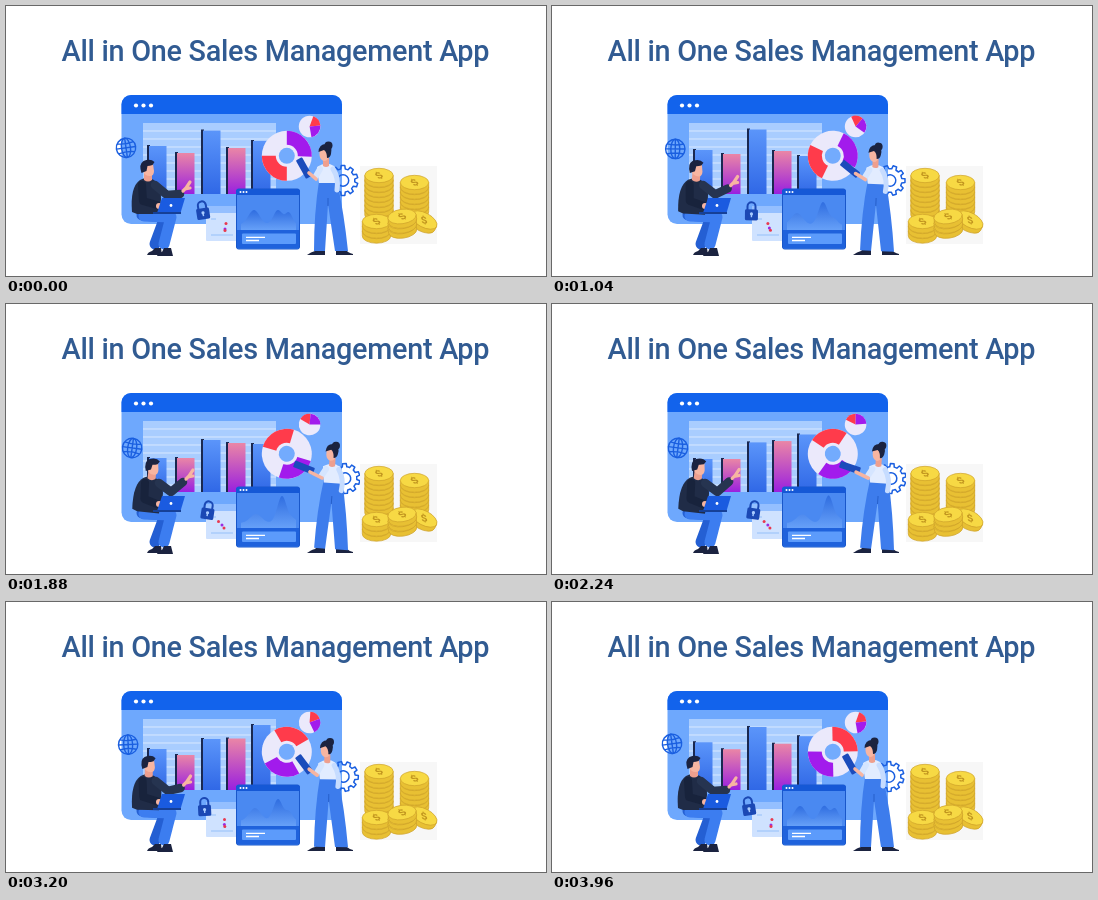
Write an HTML page that moves like this. It is 540 px wide and 270 px high and loops after 4 s.

```html
<!DOCTYPE html>
<html lang="en">
<head>
<meta charset="utf-8">
<title>Sales Management</title>
<style>
html, body { margin: 0; width: 100%; height: 100%; overflow: hidden; background: #fff; }
svg { display: block; width: 100%; height: 100%; }
.title { font: 500 28.8px Roboto, "Open Sans", sans-serif; letter-spacing: -.28px; fill: #315b92; }
.coin { font: 700 12px Roboto, sans-serif; fill: #c1951f; text-anchor: middle; }
.limb { fill: none; stroke-linecap: round; stroke-linejoin: round; }
</style>
</head>
<body>
<svg viewBox="0 0 540 270">
  <defs>
    <linearGradient id="blueBar" x1="0" y1="0" x2="0" y2="1">
      <stop offset="0" stop-color="#5b95fa"/><stop offset="1" stop-color="#3068e6"/>
    </linearGradient>
    <linearGradient id="pinkBar" x1="0" y1="0" x2="0" y2="1">
      <stop offset="0" stop-color="#ea86a6"/><stop offset="1" stop-color="#9a20df"/>
    </linearGradient>
    <linearGradient id="waveFill" x1="0" y1="0" x2="0" y2="1">
      <stop offset="0" stop-color="#2f6de0"/><stop offset="1" stop-color="#66a0f8"/>
    </linearGradient>
  </defs>
  <rect width="540" height="270" fill="#fff"/>
  <text class="title" x="55.5" y="55">All in One Sales Management App</text>

  <!-- main window -->
  <rect x="115.500" y="89" width="220.500" height="129" rx="9.500" fill="#6ea8fd"/>
  <path d="M115.500 108V98.500a9.500 9.500 0 0 1 9.500-9.500H326.500a9.500 9.500 0 0 1 9.500 9.500V108Z" fill="#1263ec"/>
  <g fill="#fff"><circle cx="130" cy="99.500" r="2.100"/><circle cx="137.500" cy="99.500" r="2.100"/><circle cx="145" cy="99.500" r="2.100"/></g>
  <rect x="137" y="117" width="133" height="71" fill="#a9cdff"/>
  <g id="grid" stroke="#d8e8ff" stroke-width="1"></g>
  <g id="bars"></g>
  <g id="donut"></g>
  <g id="pie"></g>

  <g id="globe" fill="none" stroke="#1a5fe0" stroke-width="1.400">
    <circle r="9.700"/><ellipse rx="4.500" ry="9.700"/>
    <path d="M0-9.700V9.700M-9.700 0H9.700M-8.200-5Q0-3 8.200-5M-8.200 5Q0 3 8.200 5"/>
  </g>
  <g id="gear" fill="none" stroke="#1a5fe0" stroke-width="1.500" stroke-linejoin="round">
    <path id="teeth"/><circle r="5.700"/>
  </g>

  <!-- small card with lock -->
  <rect x="200" y="200" width="33" height="35" rx="1" fill="#cfe2ff"/>
  <rect x="200" y="200" width="33" height="7" fill="#94bfff"/>
  <path d="M205 213H210M205 229H227" stroke="#a9cbfb" stroke-width="1.400"/>
  <g id="dots"></g>
  <g id="lock">
    <path d="M-4-1V-5a4 4 0 0 1 8 0V-1" fill="none" stroke="#1b48b4" stroke-width="2"/>
    <rect x="-6.500" y="-2" width="13" height="11" rx="1.500" fill="#1b48b4"/>
    <circle cy="2.500" r="1.600" fill="#a9cbff"/><path d="M0 3V6" stroke="#a9cbff" stroke-width="1.400"/>
  </g>

  <!-- wave window -->
  <rect x="230.500" y="183" width="63" height="60" rx="2" fill="#4a89f1" stroke="#1957ca" stroke-width="1"/>
  <path d="M230 189V185.500a2.500 2.500 0 0 1 2.500-2.500H291.500a2.500 2.500 0 0 1 2.500 2.500V189Z" fill="#1558d6"/>
  <g fill="#fff"><circle cx="234.500" cy="186" r="1"/><circle cx="237.500" cy="186" r="1"/><circle cx="240.500" cy="186" r="1"/></g>
  <path id="wave" fill="url(#waveFill)"/>
  <rect x="231" y="224" width="62" height="18.500" fill="#1f62dc"/>
  <rect x="236" y="227.500" width="54" height="10.500" rx="1" fill="#5c9bfb"/>
  <path d="M240 231.300H259M240 234.500H253" stroke="#fff" stroke-width="1.300"/>

  <!-- seated man -->
  <g class="limb" stroke="#245fd3" stroke-width="11">
    <path d="M136 209L159 211L149 238"/>
    <path d="M138 210L165 211L158 238" stroke="#3c7df0"/>
  </g>
  <path d="M141 249q1-3 5-4l3-3h6l1 7Z M151 250q1-3 5-4l2-4h7l2 8Z" fill="#1b2340"/>
  <g id="man">
    <path d="M126 206Q124 181 134 174Q141 170 148 174Q156 181 155 193L153 208H131Z" fill="#202c47"/>
    <path d="M138 166h8v8q-4 3-8 0Z" fill="#ee9f8e"/>
    <path d="M137 158h10l1 7q0 5-4 5-6 0-7-6Z" fill="#f7b5a1"/>
    <path d="M135.500 167q-3-9 2-12 7-3 11 1l-2 3q-3 1-5 1l-1 5Z" fill="#1b2340"/>
    <path d="M136 179L137 195L151 199" class="limb" stroke="#18233c" stroke-width="8"/>
  </g>
  <path id="manArm" class="limb" stroke="#263450" stroke-width="8.500"/>
  <path id="manHand" class="limb" stroke="#f7b5a1" stroke-width="3.200"/>
  <circle cx="153" cy="200" r="3" fill="#f7b5a1"/>
  <path d="M156 192H179L174.500 207H151Z" fill="#1a5be0"/>
  <path d="M147 206H175V208H147Z" fill="#164097"/>
  <circle cx="165" cy="199.500" r="1.400" fill="#fff"/>

  <!-- standing woman -->
  <path d="M301 249q4-3 8-4l2-2h8v6Z M330 249v-6h9q3 4 8 5v1Z" fill="#1b2340"/>
  <g id="woman">
    <path d="M313 175H331Q338 207 342 245H329L322 198L319 245H308Q308 207 313 175Z" fill="#3d7cec"/>
    <path d="M322 192V200" stroke="#265fca" stroke-width="1"/>
    <g id="torso">
      <path d="M311 161Q320 155 328 160Q333 168 331 177H313Z" fill="#e2ecff"/>
      <path d="M327 163Q333 172 331 184" class="limb" stroke="#c6dcff" stroke-width="5"/>
      <path d="M317 152h6v8q-3 2-6 0Z" fill="#ee9f8e"/>
      <path d="M313.500 143H323V150q-1 5-5 5-4-1-4.500-6Z" fill="#f7b5a1"/>
      <path d="M312.500 146Q313 138 320 138Q327 140 325 148Q324 152 321 152Q321 146 318 144Z" fill="#1b2340"/>
      <circle cx="322.500" cy="139.500" r="4" fill="#1b2340"/>
    </g>
  </g>
  <rect id="tablet" x="-10.500" y="-3.500" width="21" height="7" rx="1" fill="#1b4bbb"/>
  <path id="womanSleeve" class="limb" stroke="#d5e5ff" stroke-width="6"/>
  <path id="womanArm" class="limb" stroke="#f7b5a1" stroke-width="3.600"/>

  <rect x="354" y="160" width="77" height="78" fill="#f7f7f7"/>
  <g id="coins"></g>
</svg>
<script>
const NS = "http://www.w3.org/2000/svg";
const LOOP = 4000, STEP = 40;
const KEYS = [0, 440, 1040, 1880, 2560, 3200];
const $ = id => document.getElementById(id);

function set(el, attrs) {
  for (const k in attrs) el.setAttribute(k, attrs[k]);
  return el;
}
function add(parent, tag, attrs) {
  return $(parent).appendChild(set(document.createElementNS(NS, tag), attrs));
}
const mix = (a, b, s) => a + (b - a) * s;

// Smooth periodic curve through values at KEYS.
function track(v, t) {
  const n = KEYS.length;
  const time = i => KEYS[(i + n) % n] + LOOP * Math.floor(i / n);
  const val = i => v[(i + n) % n];
  const slope = i => (val(i + 1) - val(i - 1)) / (time(i + 1) - time(i - 1));
  let i = n - 1;
  while (KEYS[i] > t) i--;
  const d = time(i + 1) - time(i), u = (t - time(i)) / d, u2 = u * u, u3 = u2 * u;
  return (2 * u3 - 3 * u2 + 1) * val(i) + (u3 - 2 * u2 + u) * d * slope(i)
    + (3 * u2 - 2 * u3) * val(i + 1) + (u3 - u2) * d * slope(i + 1);
}

function polar(r, deg) {
  const a = (deg - 90) * Math.PI / 180;
  return `${(r * Math.cos(a)).toFixed(2)} ${(r * Math.sin(a)).toFixed(2)}`;
}
function sector(parent, r, from, to, fill) {
  add(parent, "path", { d: `M0 0L${polar(r, from)}A${r} ${r} 0 0 1 ${polar(r, to)}Z`, fill });
}

for (let y = 125; y < 188; y += 8) add("grid", "path", { d: `M137 ${y}H270` });

const bars = [
  { x: 143, fill: "blueBar", tops: [140, 140, 144, 154, 154, 147] },
  { x: 171, fill: "pinkBar", tops: [147, 147, 148, 154, 155, 153] },
  { x: 197, fill: "blueBar", tops: [124.5, 123, 123.5, 136, 139, 137] },
  { x: 222, fill: "pinkBar", tops: [142, 145, 145, 139, 136, 136.5] },
  { x: 247, fill: "blueBar", tops: [135, 147, 150, 140, 123, 123] }
];
for (const b of bars) {
  b.edge = add("bars", "rect", { x: b.x - 2, width: 3, fill: "#1a2850" });
  b.face = add("bars", "rect", { x: b.x, width: 17.5, fill: `url(#${b.fill})` });
}

add("donut", "circle", { r: 25, fill: "#ebe9fb" });
sector("donut", 25, 0, 92, "#a21bec");
sector("donut", 25, 180, 270, "#ff3b4b");
add("donut", "circle", { r: 11, fill: "#ebe9fb" });
add("donut", "circle", { r: 8, fill: "#73abfd" });

add("pie", "circle", { r: 10.8, fill: "#ebe9fb" });
sector("pie", 10.8, 20, 85, "#ff3b4b");
sector("pie", 10.8, 85, 170, "#a21bec");

let teeth = "";
for (let a = 0; a < 360; a += 36) {
  teeth += `${a ? "L" : "M"}${polar(11.8, a - 11)}L${polar(15, a - 7)}L${polar(15, a + 7)}`
    + `L${polar(11.8, a + 11)}A11.8 11.8 0 0 1 ${polar(11.8, a + 25)}`;
}
set($("teeth"), { d: teeth + "Z" });

const dots = ["#e8394f", "#9a2be0", "#e8394f"].map(fill => add("dots", "circle", { r: 1.5, fill }));

function coin(x, y, tilt) {
  const transform = `translate(${x} ${y}) rotate(${tilt})`;
  const stroke = { stroke: "#cfa22a", "stroke-width": .7, transform };
  add("coins", "path", { d: "M-14.2 0V4.500A14.2 7.200 0 0 0 14.2 4.500V0Z", fill: "#e8c033", ...stroke });
  add("coins", "ellipse", { rx: 14.2, ry: 7.2, fill: "#f7d944", ...stroke });
}
function stack(x, top, count, tilt = 0) {
  for (let i = count - 1; i >= 0; i--) coin(x, top + i * 5, tilt);
  const transform = `translate(${x} ${top}) rotate(${tilt}) scale(1 .75) rotate(-35)`;
  add("coins", "text", { class: "coin", y: 4.2, transform }).textContent = "$";
}
stack(373, 169.5, 8);
stack(408.5, 176.5, 6);
stack(370.5, 215.5, 3);
stack(418, 214, 1, 28);
stack(396, 210.5, 3, -8);

function wavePath(t) {
  const p1 = track([248, 247, 245, 250, 250, 249], t);
  const h1 = track([15, 11, 12, 9, 9, 13], t);
  const p2 = track([272, 268, 271, 276, 276, 272], t);
  const h2 = track([15, 16, 23, 27, 27, 22], t);
  const h3 = track([12, 8, 6, 4, 5, 9], t);
  const bump = (x, c, w, h) => h * Math.exp(-(((x - c) / w) ** 2));
  let d = "M235 224";
  for (let x = 235; x <= 290; x++) {
    const y = 219 - bump(x, p1, 8, h1) - bump(x, p2, 6.5, h2) - bump(x, p2 + 11, 5, h3);
    d += `L${x} ${y.toFixed(2)}`;
  }
  return d + "V224Z";
}

function draw(t) {
  const s = track([0, .05, .55, 1, .96, .2], t);
  const c = Math.cos(2 * Math.PI * t / LOOP);

  for (const b of bars) {
    const y = track(b.tops, t);
    set(b.face, { y, height: 188 - y });
    set(b.edge, { y: y - 1, height: 189 - y });
  }
  const turn = t * 180 / LOOP + track([0, -13, -21, 22, 18, 6], t);
  set($("donut"), { transform: `translate(280.8 149.8) rotate(${turn})` });
  set($("pie"), { transform: `translate(303.600 120.500) rotate(${-80 * s})` });
  set($("gear"), { transform: `translate(${337 + 2 * s} 174.500) rotate(${t * 72 / LOOP})` });
  set($("globe"), { transform: `translate(${123.1 - 3.1 * c} ${142.9 - 1.1 * c}) rotate(${-8 * c})` });
  set($("lock"), { transform: `translate(${199.3 - 2.7 * c} ${205.3 - c}) rotate(${-9 * c})` });

  set(dots[0], { cx: mix(220, 212.5, s), cy: 217.5 });
  set(dots[1], { cx: mix(219, 216, s), cy: mix(223, 221, s) });
  set(dots[2], { cx: mix(219, 218, s), cy: mix(224.5, 224, s) });
  set($("wave"), { d: wavePath(t) });

  set($("man"), { transform: `rotate(${6 * s} 138 208)` });
  const wx = mix(176, 179, s), wy = mix(187, 177, s);
  set($("manArm"), { d: `M${149 + 4 * s} 179L${161 + 4 * s} ${189 - s}L${wx - 2} ${wy + 1}` });
  set($("manHand"), { d: `M${wx + 1} ${wy - 2}L${wx + 4} ${wy - 5}L${wx + 8} ${wy - 11}M${wx + 3} ${wy - 4}L${wx + 8} ${wy - 5}` });

  set($("woman"), { transform: `rotate(${4.1 * s} 324 246)` });
  set($("torso"), { transform: `translate(0 ${2 * s})` });
  set($("tablet"), { transform: `translate(298 ${162 + 1.5 * s}) rotate(${61 - 40 * s})` });
  const ex = 309 + 6 * s, ey = 174 + s;
  set($("womanSleeve"), { d: `M${314 + 6 * s} ${163 + 2 * s}L${ex + 1} ${ey - 4}` });
  set($("womanArm"), { d: `M${ex + 1} ${ey - 1}L${303 + s} ${167 + s}` });
}

const start = performance.now();
function tick() {
  const t = (performance.now() - start) % LOOP;
  draw(Math.floor(t / STEP) * STEP);
  requestAnimationFrame(tick);
}
draw(0);
requestAnimationFrame(tick);
</script>
</body>
</html>
```
